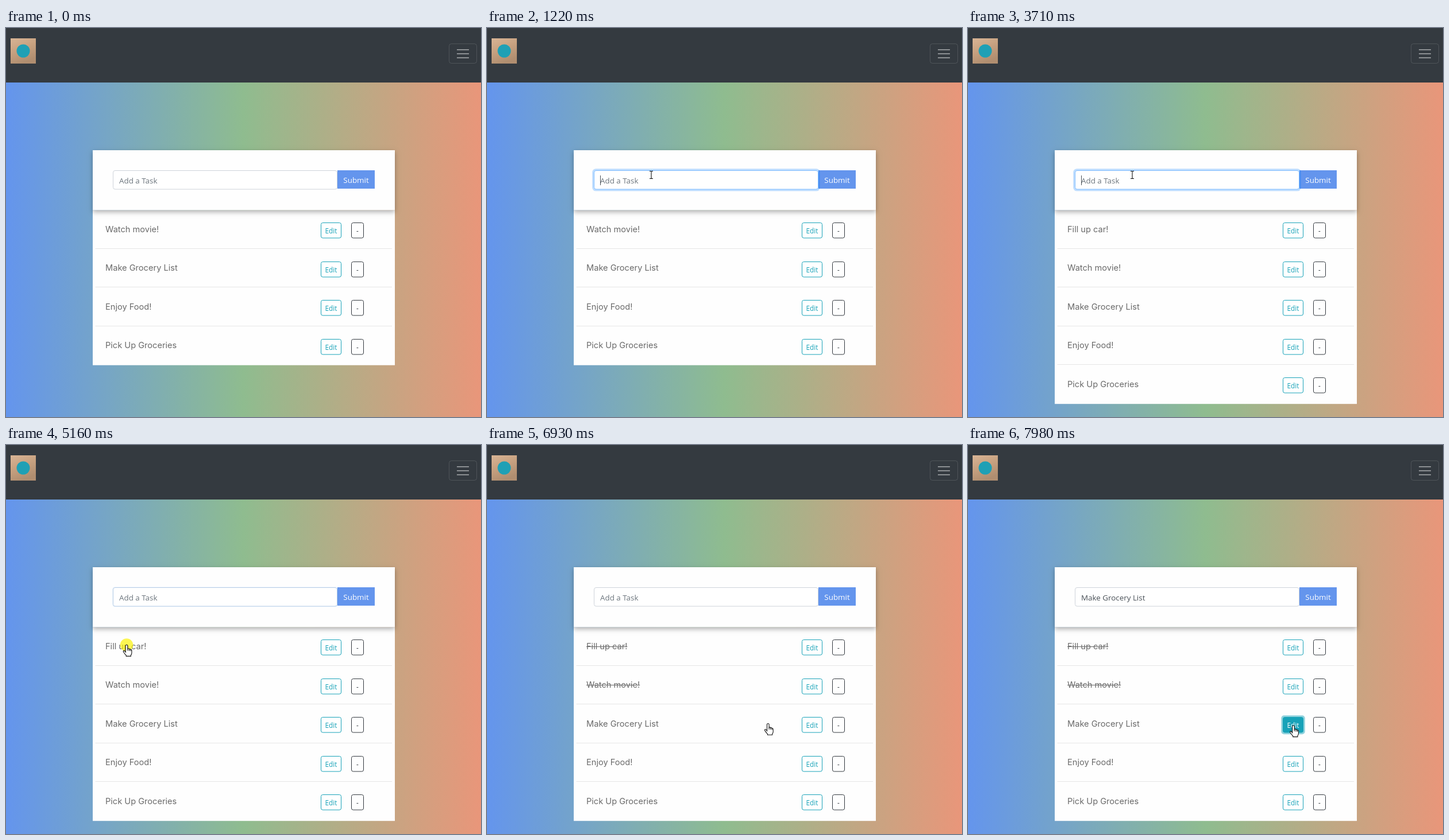
An HTML page with a canvas that plays this animation: 827x678 px, repeating every 8000 ms.

```html
<!DOCTYPE html>
<html lang="en">
<head>
<meta charset="utf-8">
<title>Task list</title>
<style>
  html, body { margin: 0; width: 100%; height: 100%; overflow: hidden; }
  canvas { display: block; }
</style>
</head>
<body>
<canvas id="stage" width="827" height="678"></canvas>
<script>
const ctx = document.getElementById('stage').getContext('2d');
const LOOP = 8000;
const UI = '"Open Sans", "Noto Sans", sans-serif';
const ITEM_FONT = '14.6px Inter, sans-serif';
const TEAL = [23, 162, 184], WHITE = [255, 255, 255];
const ROW = 67.5, LIST_TOP = 317.5;

const TASKS = ['Watch movie!', 'Make Grocery List', 'Enjoy Food!', 'Pick Up Groceries'];
const NEW_TASK = 'Fill up car!';
const KEYS = [1660, 1725, 1790, 1940, 2020, 2100, 2180, 2330, 2540, 2650, 2830, 3420];
const FOCUS = 1075, CLEARED = 3670, ADDED = 3710, BLUR = 5065, HOVER = 7285;
const PRESSES = [[1010, 1120], [5020, 5180], [5830, 5940], [7850, 7960]];
const [, FIRST_DONE, SECOND_DONE, EDITED] = PRESSES.map(p => p[1]);

const clamp = v => Math.min(1, Math.max(0, v));
const easeIn = p => p * p;
const easeOut = p => 1 - (1 - p) ** 2;
const easeInOut = p => p * p * (3 - 2 * p);
const fade = (t, start) => easeInOut(clamp((t - start) / 150));
const mix = (a, b, k) => `rgb(${a.map((v, i) => Math.round(v + (b[i] - v) * k))})`;

// Each move is a quadratic curve: from, control, to.
const MOVES = [
  { start: 330, end: 1000, ease: easeInOut, path: [[345, 617], [310, 430], [286, 256]] },
  { start: 4260, end: 4770, ease: easeInOut, path: [[286, 256], [310, 290], [210, 348.5]] },
  { start: 5300, end: 5790, ease: easeInOut, path: [[210, 348.5], [212, 390], [225, 420]] },
  { start: 5990, end: 6630, ease: easeIn, path: [[225, 420], [225, 484], [368, 485]] },
  { start: 6640, end: 7410, ease: easeOut, path: [[368, 485], [470, 484], [562, 488]] },
  { start: 7510, end: 7590, ease: easeOut, path: [[562, 488], [564, 489], [566.5, 489]] },
];

function pointerAt(t) {
  const move = MOVES.filter(m => t >= m.start).pop();
  if (!move) return null;
  const s = move.ease(clamp((t - move.start) / (move.end - move.start)));
  const [a, b, c] = move.path;
  return [0, 1].map(i => (1 - s) ** 2 * a[i] + 2 * s * (1 - s) * b[i] + s * s * c[i]);
}

function rect(x, y, w, h, color) {
  ctx.fillStyle = color;
  ctx.fillRect(x, y, w, h);
}

function rounded(x, y, w, h, r, fill, stroke) {
  ctx.beginPath();
  ctx.roundRect(x, y, w, h, r);
  if (fill) { ctx.fillStyle = fill; ctx.fill(); }
  if (stroke) { ctx.strokeStyle = stroke; ctx.lineWidth = 1; ctx.stroke(); }
}

function disc(x, y, r, color) {
  ctx.beginPath();
  ctx.arc(x, y, r, 0, Math.PI * 2);
  ctx.fillStyle = color;
  ctx.fill();
}

function text(str, x, y, font, color, align = 'left') {
  ctx.font = font;
  ctx.textAlign = align;
  ctx.fillStyle = color;
  ctx.fillText(str, x, y);
}

function gradient(x0, y0, x1, y1, colors) {
  const g = ctx.createLinearGradient(x0, y0, x1, y1);
  colors.forEach((c, i) => g.addColorStop(i / (colors.length - 1), c));
  return g;
}

function drawPage() {
  rect(0, 0, 827, 678, gradient(0, 0, 827, 0, ['cornflowerblue', 'darkseagreen', 'darksalmon']));
  rect(0, 0, 827, 95, '#343a40');
  rect(8, 18, 44, 44, gradient(8, 18, 26, 62, ['#d9b596', '#c7a180', '#b08e70']));
  disc(30, 40, 11.5, '#1fa0b5');
  rounded(771.5, 27.5, 48, 34, 4, null, 'rgba(255,255,255,.13)');
  for (const y of [37, 44, 51]) rect(785, y, 21, 1.7, 'rgba(255,255,255,.5)');
}

function drawEdit(y, hover, ring) {
  if (ring) rounded(548 - 2.8 * ring, y - 2.8 * ring, 36 + 5.6 * ring, 27.5 + 5.6 * ring, 5, `rgba(23,162,184,${0.5 * ring})`);
  rounded(548.5, y + 0.5, 35, 26.5, 3, mix(WHITE, TEAL, hover), mix(TEAL, TEAL, 0));
  text('Edit', 566, y + 18.5, `11.8px ${UI}`, mix(TEAL, WHITE, hover), 'center');
}

function drawList(t) {
  const added = t >= ADDED;
  const tasks = added ? [NEW_TASK, ...TASKS] : TASKS;
  rect(151, LIST_TOP, 526, ROW * tasks.length + 0.2, '#fefefe');
  tasks.forEach((task, i) => {
    const top = LIST_TOP + i * ROW;
    const editing = added && i === 2;
    text(task, 173, top + 38, ITEM_FONT, '#6a6a6a');
    if ((i === 0 && t >= FIRST_DONE) || (i === 1 && t >= SECOND_DONE)) {
      rect(173, Math.round(top + 33), ctx.measureText(task).width, 1, '#6a6a6a');
    }
    const y = Math.floor(top + 22);
    drawEdit(y, editing ? fade(t, HOVER) : 0, editing ? fade(t, 7850) : 0);
    rounded(601.5, y + 0.5, 21, 26.5, 3, '#fefefe', '#343a40');
    text('-', 612, y + 18.5, `11.8px ${UI}`, '#343a40', 'center');
    if (i < tasks.length - 1) rect(155.5, Math.floor(top + ROW - 1), 516.5, 1, '#e6e6e6');
  });
}

function caretOn(t) {
  if (t < FOCUS || t >= BLUR) return false;
  const last = [FOCUS, ...KEYS].filter(k => k <= t).pop();
  return (t - last) % 1040 < 520;
}

function drawForm(t) {
  ctx.save();
  ctx.shadowColor = 'rgba(0,0,0,.3)';
  ctx.shadowBlur = 8;
  ctx.shadowOffsetY = 3;
  rect(151, 213, 526, 104.5, '#fefefe');
  ctx.restore();

  rect(577, 248, 65, 32, '#6495ed');
  text('Submit', 609.5, 269.5, `13.4px ${UI}`, '#fff', 'center');

  const focus = fade(t, FOCUS) - fade(t, BLUR);
  if (focus > 0) {
    const grow = 2.8 * focus;
    rounded(186 - grow, 248 - grow, 391 + 2 * grow, 33.5 + 2 * grow, 3.5 + grow, `rgba(0,123,255,${0.25 * focus})`);
  }
  rounded(186.5, 248.5, 390, 32.5, 3.5, '#fff', mix([206, 212, 218], [128, 189, 255], focus));

  const count = t < CLEARED ? KEYS.filter(k => k <= t).length : 0;
  const value = t >= EDITED ? 'Make Grocery List' : NEW_TASK.slice(0, count);
  text(value || 'Add a Task', 197, 271, `13.4px ${UI}`, value ? '#495057' : '#6c757d');
  if (caretOn(t)) {
    const x = Math.round(197 + ctx.measureText(value).width);
    rect(x, 257, 1, 17, '#495057');
  }
}

const HAND = new Path2D('M-1.8 12.5V1.6a1.8 1.8 0 0 1 3.6 0V6.6Q3.4 5.7 4.5 7.2Q6.2 6.4 7 8.2Q8.9 7.8 8.9 9.8V14Q8.9 16 7.4 17.6V19.6H-.8V18Q-2.8 16.5-5.6 12Q-6.2 10-4.6 9.9Q-3.2 10.2-1.8 12.5Z');
const KNUCKLES = new Path2D('M1.8 6.6V10M4.5 7.2V10.4M7 8.2V10.8');
const ARROW = new Path2D('M.5 .5V16.5L4.2 13L6.6 18.6L9 17.6L6.6 12.2H11.7Z');
const BEAM = new Path2D('M-3 -6.5H-1Q0 -6.5 0 -5.5V5.5Q0 6.5 -1 6.5H-3M3 -6.5H1Q0 -6.5 0 -5.5M0 5.5Q0 6.5 1 6.5H3');

function drawPointer(t) {
  const at = pointerAt(t);
  if (!at) return;
  const [x, y] = at;
  if (PRESSES.some(([down, up]) => t >= down && t < up)) disc(x, y, 11.2, 'rgba(250,242,0,.68)');

  const listBottom = LIST_TOP + ROW * (t >= ADDED ? 5 : 4);
  const overInput = x > 186 && x < 577 && y > 248 && y < 281.5;
  const overList = x > 151 && x < 677 && y > LIST_TOP && y < listBottom;
  ctx.save();
  ctx.translate(x, y);
  ctx.strokeStyle = '#111';
  ctx.fillStyle = '#fff';
  ctx.lineWidth = 1.1;
  if (overInput) {
    ctx.stroke(BEAM);
  } else if (overList) {
    ctx.fill(HAND);
    ctx.stroke(HAND);
    ctx.stroke(KNUCKLES);
  } else {
    ctx.fill(ARROW);
    ctx.stroke(ARROW);
  }
  ctx.restore();
}

const begin = performance.now();
function render() {
  const t = (performance.now() - begin) % LOOP;
  drawPage();
  drawList(t);
  drawForm(t);
  drawPointer(t);
  requestAnimationFrame(render);
}
render();
</script>
</body>
</html>
```
